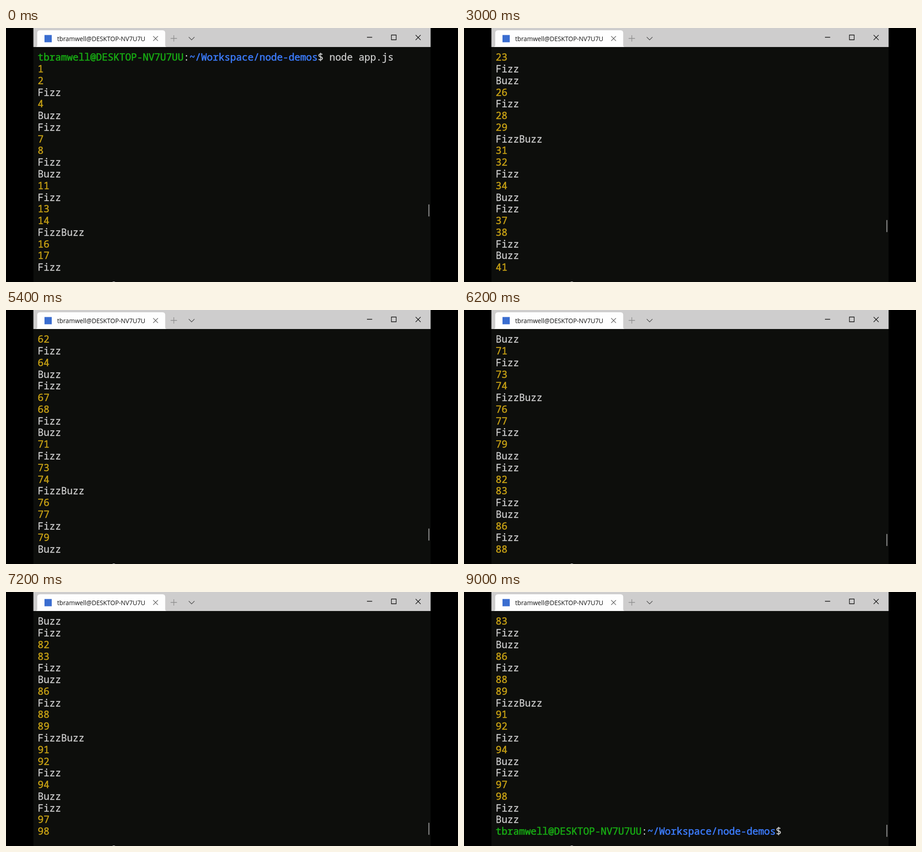
An HTML page for the animation above (9400 ms loop, 998 by 561 pixels).

```html
<!DOCTYPE html>
<html lang="en">
<head>
<meta charset="utf-8">
<title>FizzBuzz terminal</title>
<style>
  html, body { margin: 0; width: 100%; height: 100%; overflow: hidden; background: #000; }
  svg { display: block; width: 998px; height: 561px; }
  .mono { font: 21.47px "Noto Sans Mono", "DejaVu Sans Mono", monospace; white-space: pre; }
  .plain { fill: #d0d0d0; stroke: #d0d0d0; stroke-width: .3; }
  .num { fill: #c59f14; stroke: #c59f14; stroke-width: .6; }
  .user { fill: #17a813; stroke: #17a813; stroke-width: .7; }
  .path { fill: #3b7af8; stroke: #3b7af8; stroke-width: .7; }
  .tab { font: 13.7px "Open Sans", "Noto Sans", sans-serif; fill: #111; }
  .icon { fill: none; stroke-width: 1.3; }
</style>
</head>
<body>
<svg viewBox="0 0 998 561">
  <rect width="998" height="561" fill="#000"/>
  <rect x="60.500" width="877" height="561" fill="#0d0e0c"/>
  <rect x="60.500" width="877" height="42" fill="#cecdcd"/>
  <path d="M65 42q4 0 4-4V11q0-6 6-6h270.500q6 0 6 6v27q0 4 4 4z" fill="#fefefe"/>
  <rect x="85" y="15.500" width="16" height="16" fill="#3a6dd0"/>
  <text class="tab" x="113" y="29">tbramwell@DESKTOP-NV7U7U</text>
  <path class="icon" stroke="#666" d="M325 18l10.500 10.500m0-10.500l-10.500 10.500"/>
  <path class="icon" stroke="#8c8c8c" d="M363.500 23h14m-7-7v14"/>
  <path class="icon" stroke="#555" d="M403.500 20l6.300 6.300l6.300-6.300"/>
  <path class="icon" stroke="#111" d="M797 20.500h11.500M851 15.500h10.500v10.500h-10.500zM904.500 15.500l11 11m0-11l-11 11"/>
  <g id="rows"></g>
  <rect id="thumb" x="932.600" width="2.200" height="26.500" fill="#8d8d8d"/>
  <path d="M234.500 561q3.500-2 7 0z" fill="#ddd"/>
</svg>
<script>
const LOOP = 9400, STEP = 200, ROWS = 19, LAST = 101;
const LEFT = 70, BASE = 72.3, PITCH = 25.77;

// Each flick of the wheel eases out to its end line.
const FLICKS = [
  { at: 2000, steps: 3, end: 14 },
  { at: 2800, steps: 2, end: 23 },
  { at: 3600, steps: 2, end: 32 },
  { at: 4200, steps: 3, end: 47 },
  { at: 5200, steps: 2, end: 62 },
  { at: 5800, steps: 3, end: 70 },
  { at: 6600, steps: 4, end: 80 },
  { at: 7400, steps: 2, end: 83 }
];

const easeOut = p => 1 - (1 - p) ** 2;

function topLine(ms) {
  let top = 0;
  for (const { at, steps, end } of FLICKS) {
    if (ms < at) break;
    const step = Math.floor((ms - at) / STEP) + 1;
    top += (end - top) * easeOut(Math.min(1, step / steps));
  }
  return Math.round(top);
}

const prompt = cmd => [
  ["user", "tbramwell@DESKTOP-NV7U7UU"], ["plain", ":"],
  ["path", "~/Workspace/node-demos"], ["plain", "$" + cmd]
];

function line(n) {
  if (n === 0) return prompt(" node app.js");
  if (n === LAST) return prompt("");
  const word = (n % 3 ? "" : "Fizz") + (n % 5 ? "" : "Buzz");
  return [word ? ["plain", word] : ["num", String(n)]];
}

function make(tag, parent, attrs) {
  const el = document.createElementNS("http://www.w3.org/2000/svg", tag);
  for (const key in attrs) el.setAttribute(key, attrs[key]);
  return parent.appendChild(el);
}

const group = document.getElementById("rows");
const thumb = document.getElementById("thumb");
const rows = Array.from({ length: ROWS }, (_, i) =>
  make("text", group, { class: "mono", x: LEFT, y: BASE + i * PITCH }));
let shown = -1;

function draw(ms) {
  const top = topLine(ms);
  if (top === shown) return;
  shown = top;
  rows.forEach((row, i) => {
    row.textContent = "";
    for (const [cls, text] of line(top + i))
      make("tspan", row, { class: cls }).textContent = text;
  });
  thumb.setAttribute("y", 389.7 + top * 1.5);
}

const start = performance.now();
function tick() {
  draw((performance.now() - start) % LOOP);
  requestAnimationFrame(tick);
}
tick();
</script>
</body>
</html>
```
